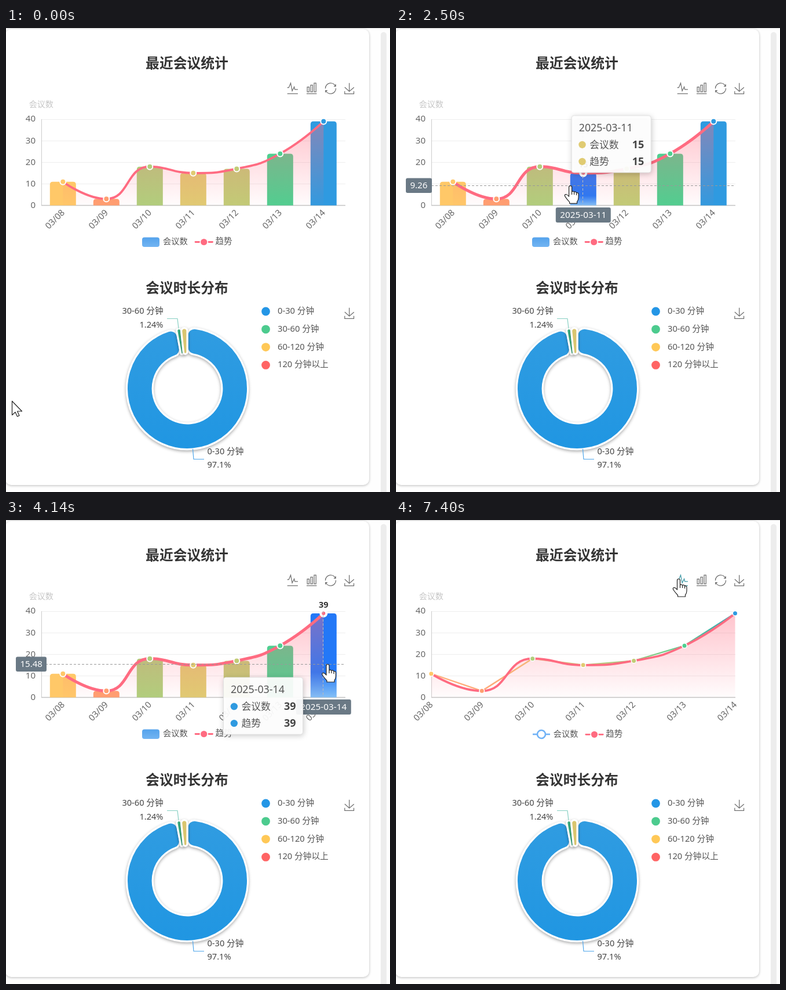
Animation of 663 by 799 pixels, one loop 8000 ms. Source, as an HTML page:

```html
<!DOCTYPE html>
<html lang="zh">
<head>
<meta charset="utf-8">
<title>会议统计</title>
<style>
html, body { margin: 0; width: 100%; height: 100%; overflow: hidden; background: #fefefe; }
body { position: relative; }
.top { position: absolute; left: 0; right: 0; top: 0; height: 1px; background: #dedede; }
.card { position: absolute; left: -1px; top: 2px; width: 628px; height: 785px; border-radius: 10px; background: #fff; box-shadow: 0 1px 4px rgba(0,0,0,.27); }
.scroll { position: absolute; left: 647px; top: 7px; width: 10px; height: 820px; border-radius: 5px; background: #ededed; }
svg { position: absolute; left: 0; top: 0; }
text { font-family: "Noto Sans", "Noto Sans CJK SC", "Noto Sans CJK JP", sans-serif; white-space: pre; }
</style>
</head>
<body>
<div class="top"></div><div class="card"></div><div class="scroll"></div>
<svg id="stage" width="663" height="799" viewBox="0 0 663 799">
  <defs>
    <linearGradient id="area" x2="0" y2="1"><stop stop-color="#ff6b81" stop-opacity=".4"/><stop offset="1" stop-color="#ff6b81" stop-opacity=".02"/></linearGradient>
    <linearGradient id="hot" x2="0" y2="1"><stop stop-color="#2378f7"/><stop offset=".7" stop-color="#2378f7"/><stop offset="1" stop-color="#83bff6"/></linearGradient>
    <linearGradient id="key" x2="0" y2="1"><stop stop-color="#55a3ec"/><stop offset="1" stop-color="#72b4f2"/></linearGradient>
    <linearGradient id="ring" x2="0" y2="1"><stop stop-color="#309ce1"/><stop offset="1" stop-color="#2096e2"/></linearGradient>
    <linearGradient id="scale" gradientUnits="userSpaceOnUse" x1="61" x2="585.5"></linearGradient>
    <clipPath id="reveal"><rect id="wipe" x="58" y="140" width="0" height="180"/></clipPath>
  </defs>
</svg>
<script>
const LOOP = 8000, ENTER = 860, LEAVE = 4745, SWITCH = 6335;
const LEFT = 60.8, RIGHT = 585.5, BASE = 305.5, STEP = 75;
const values = [11, 3, 18, 15, 17, 24, 39];
const colors = ['#ffc868', '#ff9f70', '#b0cf7c', '#e0cb72', '#c1cc76', '#4fcf90', '#2f9ae0'];
const days = values.map((_, i) => '03/' + String(8 + i).padStart(2, '0'));
const yOf = v => BASE - v * 3.7125;
const bandX = i => LEFT + STEP * (i + .5);
const edgeX = i => LEFT + (RIGHT - LEFT) / 6 * i;
const clamp = (v, a = 0, b = 1) => Math.min(b, Math.max(a, v));
const lerp = (a, b, k) => a + (b - a) * k;
const stage = document.getElementById('stage');

function set(node, attrs) {
  for (const k in attrs) node.setAttribute(k, attrs[k]);
  return node;
}
function el(tag, attrs, parent = stage) {
  return parent.appendChild(set(document.createElementNS('http://www.w3.org/2000/svg', tag), attrs));
}
// y is the middle of the line
function text(str, x, y, size, attrs = {}, parent = stage) {
  const n = el('text', { x, y: y + size * .36, 'font-size': size, fill: '#555', ...attrs }, parent);
  n.textContent = str;
  return n;
}
const path = (d, attrs, parent) => el('path', { d, fill: 'none', ...attrs }, parent);
const show = (node, on) => node.setAttribute('display', on ? 'inline' : 'none');
const mid = { 'text-anchor': 'middle' }, end = { 'text-anchor': 'end' };

['#ffb480', '#ffa878', '#f5b87a', '#c3ca7c', '#9fcc82', '#5acb92', '#2a9fb8'].forEach((c, i) =>
  el('stop', { offset: i / 6, 'stop-color': c }, document.getElementById('scale')));

// Titles and toolbox
for (const [s, y] of [['最近会议统计', 60], ['会议时长分布', 447]])
  text(s, 312.5, y, 23.8, { ...mid, 'font-weight': 700, fill: '#333' });

const icons = {
  line: ['M4.1,28.9h7.1l9.3-22l7.4,38l9.7-19.7l3,12.8h14.9M4.1,58h51.4', 29.8, 32.5, .355],
  bar: ['M6.7,22.9h10V48h-10V22.9zM24.9,13h10v35h-10V13zM43.2,2h10v46h-10V2zM3.1,58h53.7', 30, 30, .325],
  restore: ['M47,18.9h9.8V8.7M56.3,20.1C52.1,9,40.5,0.6,26.8,2.1C12.6,3.7,1.6,16.2,2.1,30.6M13,41.1H3.1v10.2M3.7,39.9c4.2,11.1,15.8,19.5,29.5,18c14.2-1.6,25.2-14.1,24.7-28.5', 30, 30, .325],
  save: ['M4.7,22.9L29.3,45.5L54.7,23.4M4.6,43.6L4.6,58L53.8,58L53.8,43.6M29.2,45.1L29.2,0', 29.6, 29, .32]
};
function icon(name, x, y) {
  const [d, cx, cy, s] = icons[name];
  return path(d, { stroke: '#707070', 'stroke-width': 1.25 / s, transform: `translate(${x} ${y}) scale(${s}) translate(${-cx} ${-cy})` });
}
const lineIcon = icon('line', 494.8, 104);
icon('bar', 527.7, 104);
icon('restore', 560.5, 104);
icon('save', 592.8, 104);
icon('save', 592.8, 491);

// Axes
text('会议数', LEFT, 131, 14.1, { ...mid, fill: '#c6c6c6', 'font-weight': 500 });
for (let v = 0; v <= 40; v += 10) {
  text(v, 51, yOf(v) - 1, 15, { ...end, fill: '#666' });
  if (v) path(`M61 ${Math.floor(yOf(v)) + .5}H586`, { stroke: '#eee' });
}
path('M61.5 157V306', { stroke: '#ccc' });
path('M61 305.5H586', { stroke: '#c4c4c4', 'stroke-width': 1.3 });
const dayLabels = days.map(d => text(d, 0, 0, 15, { ...end, fill: '#666' }));

// Series
const barLayer = el('g');
const bars = values.map((v, i) => {
  const x = bandX(i) - 22.5, y = yOf(v);
  return path(`M${x} ${BASE}V${y + 5}q0 -5 5 -5h35q5 0 5 5V${BASE}z`, { fill: colors[i] }, barLayer);
});
const area = path('', { fill: 'url(#area)' });
const swapped = path('M' + values.map((v, i) => edgeX(i) + ' ' + yOf(v)).join('L'),
  { stroke: 'url(#scale)', 'stroke-width': 2.5, 'stroke-linejoin': 'round', 'clip-path': 'url(#reveal)' });
const trend = path('', { stroke: '#ff6b81', 'stroke-linejoin': 'round' });
const dots = values.map((v, i) => el('circle', { cy: yOf(v), fill: colors[i], stroke: '#fff' }));
const valueLabel = text('', 0, 0, 14.5, { ...mid, 'font-weight': 700, fill: '#333' });
const wipe = document.getElementById('wipe');

// Smooth curve through points whose control points never overshoot
function smooth(p) {
  let d = `M${p[0]}`, c0 = p[0];
  for (let i = 1; i < p.length; i++) {
    const a = p[i - 1], b = p[i], n = p[i + 1];
    let c1 = b, next = b;
    if (n) {
      const la = Math.hypot(b[0] - a[0], b[1] - a[1]), ln = Math.hypot(n[0] - b[0], n[1] - b[1]);
      c1 = []; next = [];
      for (const k of [0, 1]) {
        const out = clamp(b[k] + (n[k] - a[k]) * .5 * ln / (ln + la), Math.min(b[k], n[k]), Math.max(b[k], n[k]));
        c1[k] = clamp(b[k] - (out - b[k]) * la / ln, Math.min(a[k], b[k]), Math.max(a[k], b[k]));
        next[k] = b[k] + (b[k] - c1[k]) * ln / la;
      }
    }
    d += `C${c0} ${c1} ${b}`;
    c0 = next;
  }
  return d;
}

// Legend
const keyBar = el('rect', { x: 235, y: 360.5, width: 30, height: 16.5, rx: 4, fill: 'url(#key)' });
const keyLine = el('g', { stroke: '#70b2f6', 'stroke-width': 2.6, fill: '#fff' });
path('M236 369H266', {}, keyLine);
el('circle', { cx: 251, cy: 369, r: 7 }, keyLine);
const keys = el('g');
text('会议数', 271, 367, 14.2, {}, keys);
path('M327 368.5h6.5M350 368.5h6.5', { stroke: '#ff6b81', 'stroke-width': 2.8, 'stroke-linecap': 'round' }, keys);
el('circle', { cx: 341.7, cy: 368.5, r: 5.6, fill: '#ff6b81' }, keys);
text('趋势', 361.5, 367, 14.4, {}, keys);

// Ring
const CX = 313, CY = 621, OUTER = 104.6, INNER = 59.8;
const polar = (r, a) => [CX + r * Math.sin(a), CY - r * Math.cos(a)];
// Sector whose corners are arcs tangent to its sides
function slice(from, to, fill) {
  const a = from * Math.PI / 180, b = to * Math.PI / 180;
  const s = Math.sin(Math.min(b - a, 1) / 2), big = b - a > Math.PI ? 1 : 0;
  const o = Math.min(12, OUTER * s / (1 + s)), n = Math.min(12, INNER * s / (1 - s));
  const oa = Math.asin(o / (OUTER - o)), na = Math.asin(n / (INNER + n));
  const or = (OUTER - o) * Math.cos(oa), nr = (INNER + n) * Math.cos(na);
  const arc = (r, large, sweep, p) => `A${r} ${r} 0 ${large} ${sweep} ${p}`;
  path(`M${polar(or, a)}` + arc(o, 0, 1, polar(OUTER, a + oa)) + arc(OUTER, big, 1, polar(OUTER, b - oa)) +
    arc(o, 0, 1, polar(or, b)) + `L${polar(nr, b)}` + arc(n, 0, 1, polar(INNER, b - na)) +
    arc(INNER, big, 0, polar(INNER, a + na)) + arc(n, 0, 1, polar(nr, a)) + 'Z',
    { fill, stroke: '#fff', 'stroke-width': 3.2, style: 'filter:drop-shadow(0 2px 2.5px rgba(0,0,0,.33))' });
}
slice(0, 349.56, 'url(#ring)');
slice(349.56, 354.02, '#3fb184');
slice(354.02, 360, '#d9c56f');
path('M298 517.5L296 500.5H278', { stroke: '#86cfc2', 'stroke-width': 1.2 });
path('M322.5 725L324 742.5H342', { stroke: '#4fa6ea', 'stroke-width': 1.2 });
const dark = { fill: '#444' };
text('30-60 分钟', 271.5, 487, 14.6, { ...end, ...dark });
text('1.24%', 271.5, 510.5, 14.6, { ...end, ...dark });
text('0-30 分钟', 347.5, 728.5, 14.6, dark);
text('97.1%', 347.5, 752, 14.6, dark);
[['0-30 分钟', '#2496e6'], ['30-60 分钟', '#4ccb8e'], ['60-120 分钟', '#ffc857'], ['120 分钟以上', '#ff6464']].forEach(([s, fill], i) => {
  const y = 488 + i * 30.8;
  el('circle', { cx: 448.5, cy: y, r: 7.4, fill });
  text(s, 469, y - 1.2, 14.7);
});

// Axis pointer
const cross = el('g');
const dash = { 'stroke-dasharray': '4 3' };
const vLine = path('', { ...dash, stroke: '#bbb' }, cross);
const hLine = path('', { ...dash, stroke: '#999' }, cross);
const tag = { fill: '#6a7985', rx: 3 };
const yTag = el('rect', { ...tag, x: 17, height: 25.6 }, cross);
const yTagText = text('', 24.5, 0, 15, { fill: '#fff' }, cross);
const xTag = el('rect', { ...tag, y: 309, width: 95, height: 26 }, cross);
const xTagText = text('', 0, 321, 15.3, { ...mid, fill: '#fff' }, cross);

// Tooltip
const tip = el('g');
const tipBox = el('rect', { height: 98, rx: 4, fill: '#fff', 'fill-opacity': .93, stroke: '#e2e2e2', style: 'filter:drop-shadow(1px 2px 5px rgba(0,0,0,.22))' }, tip);
const tipDate = text('', 12.5, 20.5, 17.8, {}, tip);
const tipRows = ['会议数', '趋势'].map((name, i) => {
  const y = 49.5 + i * 29;
  const dot = el('circle', { cx: 18.3, cy: y + .5, r: 6.2 }, tip);
  text(name, 31, y, 16.8, {}, tip);
  return { dot, num: text('', 0, y, 18, { ...end, 'font-weight': 700, fill: '#444' }, tip) };
});

// Mouse
const pen = { fill: '#fff', stroke: '#222', 'stroke-width': 1.2, 'stroke-linejoin': 'round' };
const arrow = path('M.5 .5V24.5L6 19.5L9.5 27L13 25.4L9.6 18H17.5Z', pen);
const hand = path('M-2.5 3Q-2.5 .5 0 .5Q2.5 .5 2.5 3V11Q4.5 9 6.5 11.3Q8.8 9.8 10.5 12.6Q14 11.8 14 15.5V21Q14 25 11.5 28V31H-1.5V28.5Q-5 25 -8.5 20Q-11 16.5 -8.5 15.5Q-6 14.8 -2.5 19ZM2.5 11V16M6.5 11.3V16M10.5 12.6V17', pen);

// time, x, y
const route = [
  [0, 10, 642], [60, 10, 642], [200, 102, 459], [600, 102, 459], [860, 100, 304], [1000, 96, 293],
  [1350, 126, 291], [1420, 126, 291], [1620, 132, 290], [1820, 176, 290.65], [2210, 255, 275], [2290, 255, 275],
  [3050, 421, 261], [3250, 421, 262.95], [3860, 575, 262], [3930, 560, 249], [4000, 518, 246], [4140, 555.5, 248.1],
  [4670, 542, 208], [4740, 523, 159], [4880, 509, 148], [5280, 426, 117], [5420, 426, 117],
  [5560, 500, 112], [5690, 540, 97], [5830, 488, 101], [LOOP, 488, 101]
];
function mouse(t) {
  const i = Math.max(1, route.findIndex(p => p[0] >= t));
  const a = route[i - 1], b = route[i], k = clamp((t - a[0]) / (b[0] - a[0]));
  return [lerp(a[1], b[1], k), lerp(a[2], b[2], k)];
}
const bandAt = x => clamp(Math.floor((x - LEFT) / STEP), 0, 6);
const tipWidth = i => values[i] > 9 ? 137 : 128;

// The tooltip trails the mouse: mean of its recent goals
function tipPlace(t) {
  let sx = 0, sy = 0;
  const n = 10;
  for (let k = 0; k < n; k++) {
    const [x, y] = mouse(clamp(t - 200 * (k + .5) / n, ENTER, LEAVE));
    const w = tipWidth(bandAt(x));
    sx += x + 24 + w > 627 ? x - 24 - w : x + 24;
    sy += y + 122 > 380 ? y - 122 : y + 24;
  }
  return [sx / n, sy / n];
}

function draw(t) {
  const [mx, my] = mouse(t);
  const inside = t >= ENTER && t < LEAVE;
  const asLine = t >= SWITCH;
  const hit = inside ? bandAt(mx) : -1;

  // Series
  const u = clamp((t - SWITCH) / 500);
  const k = u < .5 ? 4 * u ** 3 : 1 - (2 - 2 * u) ** 3 / 2;
  const pts = values.map((v, i) => [lerp(bandX(i), edgeX(i), k), yOf(v)]);
  const curve = smooth(pts);
  set(trend, { d: curve, 'stroke-width': inside ? 5 : 3.8 });
  set(area, { d: `${curve}L${pts[6][0]} ${BASE}L${pts[0][0]} ${BASE}Z` });
  pts.forEach(([x], i) => {
    const on = i === hit;
    set(dots[i], { cx: x, r: asLine ? 4.3 : 5, 'stroke-width': asLine ? 1.6 : on ? 4 : 2, fill: on ? '#ff6b81' : colors[i] });
    set(bars[i], { fill: on ? 'url(#hot)' : colors[i] });
    set(dayLabels[i], { transform: `translate(${x} 315) rotate(-45)` });
  });
  wipe.setAttribute('width', clamp((t - SWITCH) / 1035) * 530 + 2);
  show(swapped, asLine);
  show(barLayer, !asLine);
  show(keyBar, !asLine);
  show(keyLine, asLine);
  set(keys, { transform: asLine ? 'translate(.8 .8)' : '' });

  // Pointer
  show(cross, inside);
  show(valueLabel, inside);
  if (inside) {
    const x = bandX(hit), value = ((BASE - my) / 3.7125).toFixed(2);
    set(valueLabel, { x, y: yOf(values[hit]) - 9.5 }).textContent = values[hit];
    set(vLine, { d: `M${Math.floor(x) - .5} 157V305` });
    set(hLine, { d: `M61 ${Math.floor(my) + .5}H586` });
    set(yTag, { y: my - 12.6, width: value.length > 4 ? 53 : 45 });
    set(yTagText, { y: my + 4.6 }).textContent = value;
    set(xTag, { x: x - 47.5 });
    set(xTagText, { x }).textContent = '2025-' + days[hit].replace('/', '-');
  }

  // Tooltip
  const alpha = t < ENTER ? 0 : t < LEAVE ? clamp((t - ENTER) / 150) : clamp((4895 - t) / 150);
  show(tip, alpha > 0);
  if (alpha > 0) {
    const i = bandAt(mouse(Math.min(t, LEAVE))[0]), w = tipWidth(i);
    set(tip, { transform: `translate(${tipPlace(t)})`, opacity: alpha });
    set(tipBox, { width: w });
    tipDate.textContent = '2025-' + days[i].replace('/', '-');
    for (const { dot, num } of tipRows) {
      set(dot, { fill: colors[i] });
      set(num, { x: w - 12 }).textContent = values[i];
    }
  }

  // Mouse shape
  const onTool = my > 93 && my < 115 && mx > 484 && mx < 538;
  const onBar = inside && Math.abs(mx - bandX(hit)) < 24.5 && my > yOf(values[hit]) - 6;
  const isHand = onTool || onBar;
  show(hand, isHand);
  show(arrow, !isHand);
  set(isHand ? hand : arrow, { transform: `translate(${mx} ${my})` });
  const lit = onTool && mx < 506 && !(t >= SWITCH && t < 6430);
  set(lineIcon, { stroke: lit ? '#3e98a5' : '#707070' });
}

const start = performance.now();
function tick() {
  draw((performance.now() - start) % LOOP);
  requestAnimationFrame(tick);
}
tick();
</script>
</body>
</html>
```
